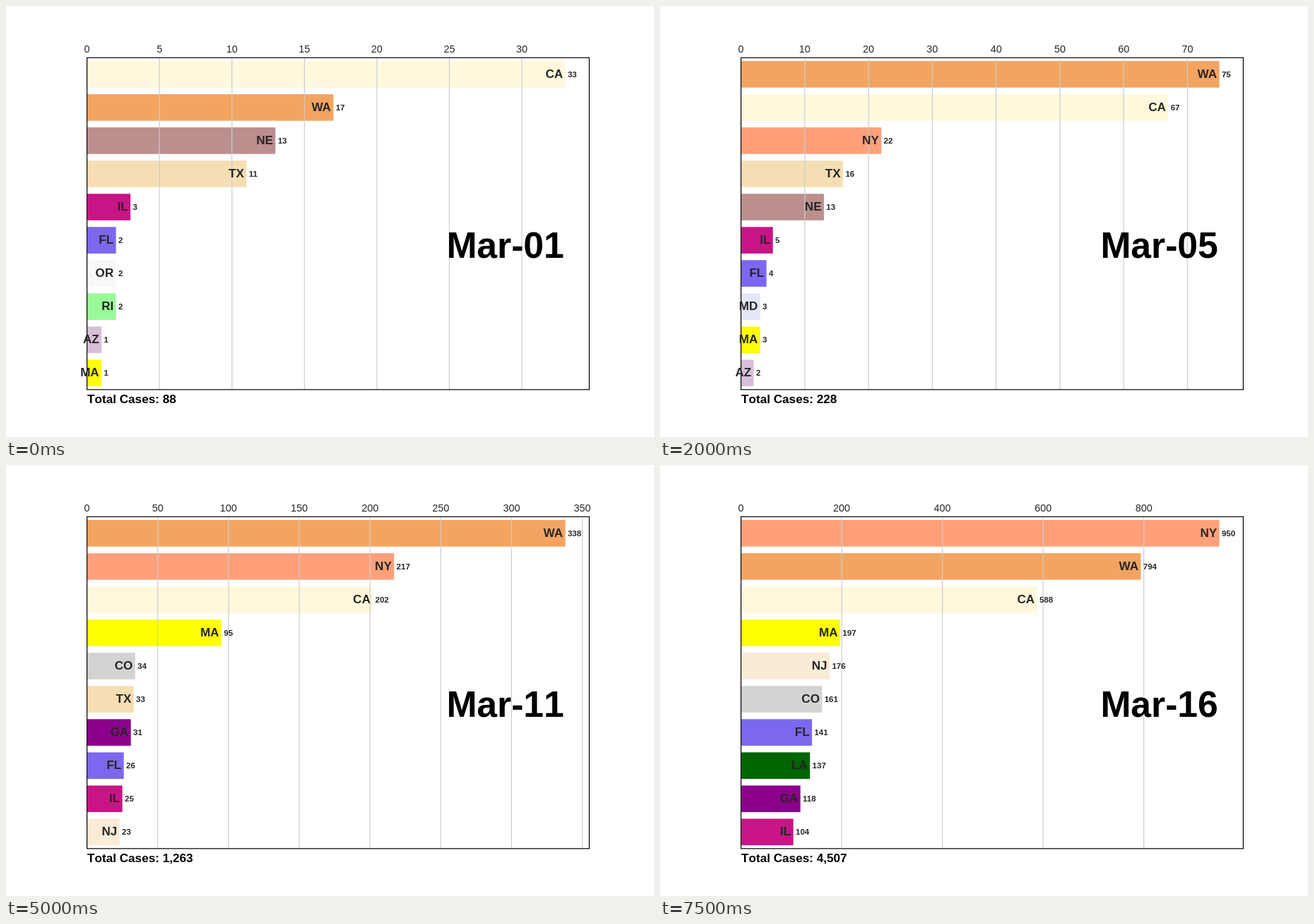
These frames come from a looping animation (917 by 611 pixels, 8 s). An HTML page:

```html
<!DOCTYPE html>
<html lang="en">
<head>
<meta charset="utf-8">
<title>Cases by state</title>
<style>
  html, body { margin: 0; width: 100%; height: 100%; overflow: hidden; background: #fff; }
  svg { display: block; width: 917px; height: 611px; }
  text { font-family: "Liberation Sans", Arial, sans-serif; fill: #262626; }
  .tick { font-size: 14.4px; text-anchor: middle; }
  .grid { stroke: #ccc; stroke-width: 1.2; }
  .frame { fill: none; stroke: #000; stroke-width: 1.2; }
  .name { font-size: 17.1px; font-weight: bold; text-anchor: end; }
  .value { font-size: 11.5px; font-weight: bold; }
  .date, .total { font-weight: bold; fill: #000; font-kerning: none; }
  .date { font-size: 51.6px; }
  .total { font-size: 17.15px; }
</style>
</head>
<body>
<svg id="chart" viewBox="0 0 917 611"></svg>
<script>
// Listed by full state name, which also decides the order of ties.
const colors = {
  AZ: "thistle", CA: "cornsilk", CO: "lightgray", FL: "mediumslateblue",
  GA: "darkmagenta", IL: "mediumvioletred", LA: "darkgreen", MD: "lavender",
  MA: "yellow", NE: "rosybrown", NH: "green", NJ: "antiquewhite",
  NY: "lightsalmon", OR: "#f8f8f8", RI: "palegreen", TX: "wheat", WA: "sandybrown"
};

// Each day: the total, then the counts that changed.
const days = [
  [88, { CA: 33, WA: 17, NE: 13, TX: 11, IL: 3, FL: 2, OR: 2, RI: 2, AZ: 1, MA: 1 }],
  [104, { CA: 38, WA: 23, IL: 4, GA: 2, MA: 2 }],
  [125, { CA: 45, WA: 32, FL: 3, AZ: 2, NH: 2 }],
  [161, { CA: 55, WA: 47, NY: 11 }],
  [228, { WA: 75, CA: 67, NY: 22, TX: 16, IL: 5, FL: 4, MD: 3, MA: 3 }],
  [311, { WA: 83, CA: 81, NY: 44, TX: 19, NE: 14, CO: 8, MA: 8, FL: 7, IL: 6, NJ: 4 }],
  [428, { WA: 108, CA: 100, NY: 89, TX: 21, NE: 15, MA: 13, FL: 12, IL: 7, OR: 7 }],
  [547, { WA: 141, CA: 112, NY: 106, MA: 28, TX: 22, NE: 16, OR: 13, GA: 11, CO: 9 }],
  [748, { WA: 179, CA: 172, NY: 142, MA: 41, TX: 24, GA: 17, FL: 14, CO: 12 }],
  [1018, { WA: 279, CA: 179, NY: 173, MA: 92, TX: 26, GA: 22, FL: 20, IL: 19, CO: 17, NE: 17 }],
  [1263, { WA: 338, NY: 217, CA: 202, MA: 95, CO: 34, TX: 33, GA: 31, FL: 26, IL: 25, NJ: 23 }],
  [1668, { WA: 419, NY: 326, CA: 252, MA: 108, CO: 49, FL: 44, TX: 43, IL: 32, NJ: 29 }],
  [2224, { WA: 511, NY: 421, CA: 320, MA: 123, CO: 77, TX: 59, FL: 50, NJ: 50, IL: 46, GA: 42 }],
  [2898, { NY: 610, WA: 609, CA: 381, MA: 138, CO: 103, LA: 77, NJ: 75, FL: 70, TX: 69, IL: 66 }],
  [3600, { NY: 732, WA: 675, CA: 478, MA: 164, CO: 136, FL: 105, GA: 99, NJ: 98, IL: 94, LA: 91 }],
  [4507, { NY: 950, WA: 794, CA: 588, MA: 197, NJ: 176, CO: 161, FL: 141, LA: 137, GA: 118, IL: 104 }]
];

const DAY_MS = 500, ROWS = 10;
const left = 114.6, right = 825.4, top_ = 73.3, bottom = 543.8;
const pitch = (bottom - top_) / ROWS;

const text = (cls, x, y, s) => `<text class="${cls}" x="${x}" y="${y}">${s}</text>`;

// Smallest round step that needs at most nine intervals.
function tickStep(range) {
  const raw = range / 9, power = 10 ** Math.floor(Math.log10(raw));
  return [1, 2, 2.5, 5, 10].find(m => m * power >= raw) * power;
}

function render(index) {
  const [total] = days[index];
  const counts = Object.assign({}, ...days.slice(0, index + 1).map(d => d[1]));
  const ranked = Object.keys(colors).filter(s => counts[s])
    .sort((a, b) => counts[b] - counts[a]).slice(0, ROWS);
  const max = counts[ranked[0]], range = max * 1.05;
  const xOf = v => left + v / range * (right - left);
  const gap = xOf(max / 200) - left;
  let bars = "", grid = "", labels = "";

  ranked.forEach((state, i) => {
    const end = xOf(counts[state]), mid = top_ + (i + 0.5) * pitch;
    bars += `<rect x="${left}" y="${mid - 0.4 * pitch}" width="${end - left}" height="${0.8 * pitch}" fill="${colors[state]}"/>`;
    labels += text("name", end - gap, mid + 5, state) + text("value", end + gap, mid + 3.7, counts[state]);
  });

  const step = tickStep(range);
  for (let v = 0; v <= range; v += step) {
    const x = xOf(v);
    grid += `<line class="grid" x1="${x}" x2="${x}" y1="${top_}" y2="${bottom}"/>`;
    labels += text("tick", x, 65.5, v);
  }

  const date = "Mar-" + String(index + 1).padStart(2, "0");
  return bars + grid +
    `<rect class="frame" x="${left}" y="${top_}" width="${right - left}" height="${bottom - top_}"/>` +
    labels + text("date", 623.4, 356.5, date) +
    text("total", 115, 562.8, "Total Cases: " + total.toLocaleString("en-US"));
}

const chart = document.getElementById("chart");
let shown = -1;

function tick() {
  const index = Math.floor(performance.now() / DAY_MS) % days.length;
  if (index !== shown) chart.innerHTML = render(shown = index);
  requestAnimationFrame(tick);
}
tick();
</script>
</body>
</html>
```
